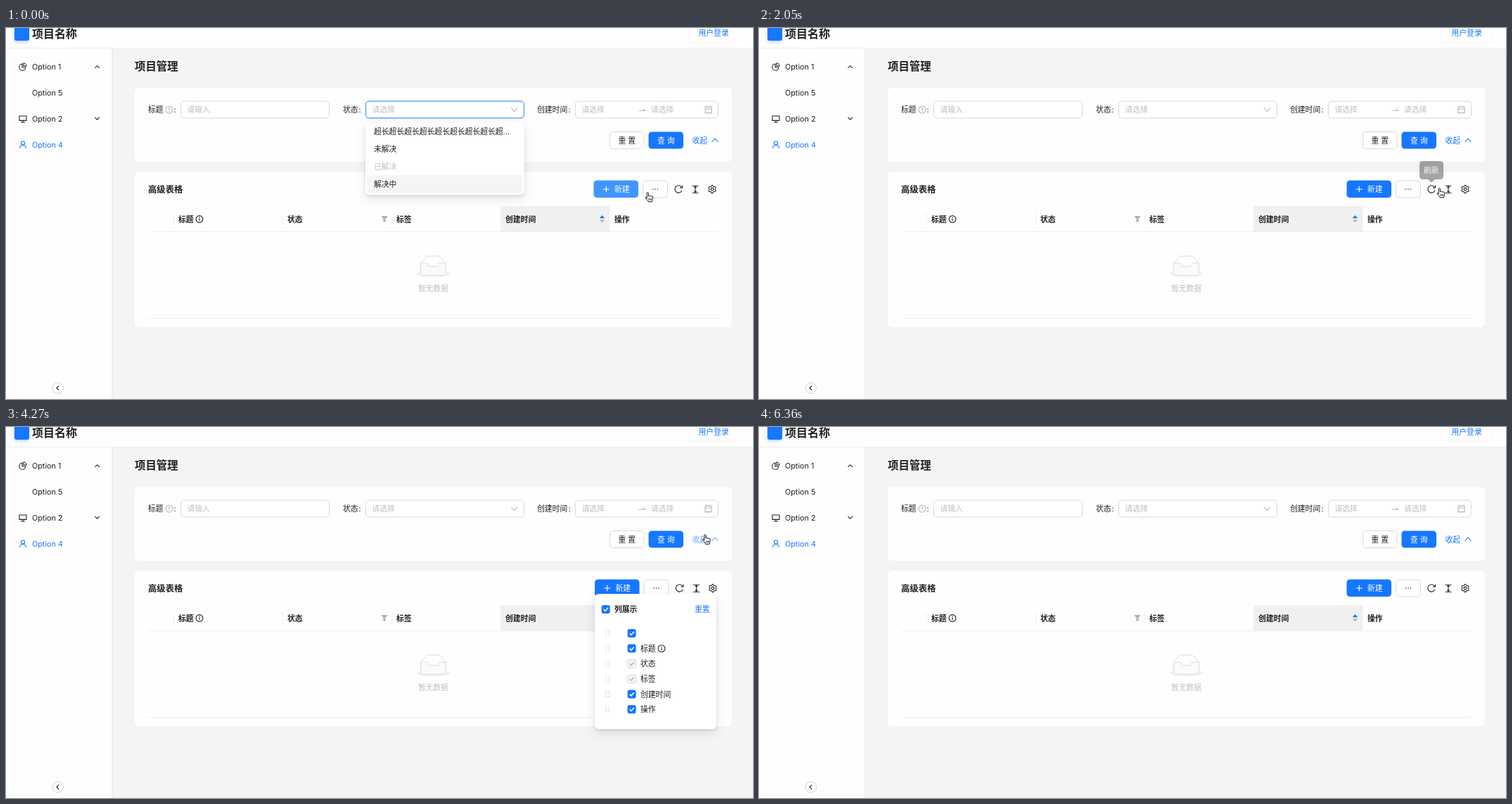
Animation, 1062 px wide and 527 px high, one loop 7110 ms. Source, as an HTML page:

```html
<!DOCTYPE html>
<html lang="zh-CN">
<head>
<meta charset="utf-8">
<title>项目管理</title>
<style>
html, body { margin: 0; width: 100%; height: 100%; overflow: hidden; background: #f4f4f4; }
svg { display: block; width: 100%; height: 100%; }
text { font-family: Inter, "Noto Sans CJK SC", "Noto Sans CJK JP", sans-serif; white-space: pre; fill: #1f1f1f; }
.b { font-weight: 600; }
.dim { fill: #bfbfbf; }
.blue { fill: #1677ff; }
.white { fill: #fff; }
.mid { text-anchor: middle; }
.ln { fill: none; stroke: #1f1f1f; stroke-width: 1.1; }
.gray { stroke: #b5b5b5; }
.lnblue { stroke: #1677ff; }
.lnwhite { stroke: #fff; }
.card { fill: #fefefe; }
.field { fill: #fff; stroke: #d9d9d9; }
.pop { fill: #fff; filter: drop-shadow(0 2px 2px rgba(0,0,0,.09)) drop-shadow(0 5px 7px rgba(0,0,0,.1)); }
.tip { fill: #212121; filter: drop-shadow(0 4px 6px rgba(0,0,0,.1)); }
.soft { fill: #fff; filter: drop-shadow(0 1.5px 1px rgba(0,0,0,.05)); }
</style>
</head>
<body>
<svg id="stage" viewBox="0 0 1062 527"></svg>
<script>
const LOOP = 7110, SIZE = 10.8, BLUE = '#1677ff';

// Drawing helpers; text is placed by its left edge and vertical centre.
const text = (x, y, str, cls = '', size = SIZE, id = '') =>
  `<text ${id && `id="${id}"`} x="${x}" y="${y + size * .38}" font-size="${size}" class="${cls}">${str}</text>`;
const rect = (x, y, w, h, r, attrs) =>
  `<rect x="${x}" y="${y}" width="${w}" height="${h}" rx="${r}" ${attrs}/>`;
const line = (d, cls = '', attrs = '') => `<path d="${d}" class="ln ${cls}" ${attrs}/>`;
const ring = (x, y, r, cls = '') => `<circle cx="${x}" cy="${y}" r="${r}" class="ln ${cls}"/>`;
const group = (id, body) => `<g id="${id}">${body}</g>`;
const chevron = (x, y, w, h, cls = '') => line(`M${x - w} ${y + h / 2}l${w} ${-h}l${w} ${h}`, cls);

const info = (x, y) => ring(x, y, 4.9) + line(`M${x} ${y - 1}v3.6M${x} ${y - 3}v1.2`);
const help = (x, y) => ring(x, y, 5, 'gray') +
  `<text x="${x}" y="${y + 2.7}" font-size="7.5" class="mid" style="fill:#8c8c8c">?</text>`;

function gear(x, y) {
  const pts = Array.from({ length: 60 }, (_, i) => {
    const a = i * Math.PI / 30, r = 4.9 + .75 * Math.cos(6 * a);
    return `${(x + r * Math.sin(a)).toFixed(2)} ${(y + r * Math.cos(a)).toFixed(2)}`;
  });
  return line(`M${pts.join('L')}Z`) + ring(x, y, 1.9);
}

const button = (x, y, w, label, main) =>
  rect(x, y, w, 24, 4.5, main ? `fill="${BLUE}"` : 'class="field"') +
  text(x + w / 2, y + 12, label, main ? 'mid white' : 'mid');

const check = (x, y, off) =>
  rect(x - 6, y - 6, 12, 12, 3, off ? 'fill="#f5f5f5" stroke="#d9d9d9"' : `fill="${BLUE}"`) +
  line(`M${x - 3} ${y}l2.2 2.4l4-4.6`, '', `style="stroke:${off ? '#b8b8b8' : '#fff'};stroke-width:1.5"`);

const tooltip = (id, x, y, w, label) => group(id,
  `<path class="tip" d="M${x - w / 2 + 5} ${y}h${w - 10}q5 0 5 5v16q0 5-5 5H${x + 5}l-5 4.5l-5-4.5H${x - w / 2 + 5}q-5 0-5-5v-16q0-5 5-5z"/>` +
  text(x, y + 13, label, 'mid white'));

const shell = () =>
  rect(0, 0, 1062, 527, 0, 'fill="#f4f4f4"') +
  rect(0, 0, 1062, 28, 0, 'fill="#fefefe"') +
  rect(0, 28, 151, 499, 0, 'fill="#fefefe"') +
  line('M0 28.5H1062', '', 'style="stroke:#eeeeee"') +
  line('M151 29V527', '', 'style="stroke:#e6e6e6"') +
  rect(12, -3, 21, 21, 3, `fill="${BLUE}" style="filter:drop-shadow(0 2px 2px rgba(22,119,255,.3))"`) +
  text(37, 8, '项目名称', 'b', 16) +
  rect(973, -5, 67, 24.5, 4.5, 'class="soft"') + text(984.5, 7, '用户登录', 'blue') +
  text(37, 55, 'Option 1') + text(37, 92, 'Option 5') +
  text(37, 129, 'Option 2') + text(37, 166, 'Option 4', 'blue') +
  line('M23 51A4.6 4.6 0 1 0 28 56H23ZM25 49.8V54H29A4.2 4.2 0 0 0 25 49.8Z') +
  line('M19 125h10v6.4h-10zM24 131.5v2.5M21 134h6') +
  ring(24, 163.6, 2.6, 'lnblue') + line('M19.5 171a4.5 4.6 0 0 1 9 0', 'lnblue') +
  chevron(129.7, 55.3, 3.2, 3.2) + chevron(129.7, 128.5, 3.2, -3.2) +
  '<circle cx="73.7" cy="511.5" r="7.7" fill="#fff" stroke="#cfcfcf"/>' +
  line('M75.2 508.3l-3.2 3.2l3.2 3.2', '', 'stroke-width="1.2"') +
  text(183, 54, '项目管理', 'b', 15.4);

const search = () =>
  rect(183, 85, 849, 105, 6, 'id="searchCard" class="card"') +
  text(202, 116, '标题') + help(232, 116) + text(238.5, 116, ':') +
  rect(248.5, 104, 211, 24, 4.5, 'class="field"') + text(257.5, 116, '请输入', 'dim') +
  text(479, 116, '状态') + text(501.5, 116, ':') +
  rect(511.5, 104, 225, 24, 4.5, 'class="field"') +
  rect(511.5, 104, 225, 24, 4.5, 'id="focus" fill="none" stroke="#4096ff" style="filter:drop-shadow(0 0 1.5px rgba(5,145,255,.3))"') +
  text(520.5, 116, '请选择', 'dim') + chevron(722.5, 116, 4.4, -5, 'gray') +
  group('range',
    text(755, 116, '创建时间') + text(799.5, 116, ':') +
    rect(809.5, 104, 203, 24, 4.5, 'class="field"') +
    text(818.5, 116, '请选择', 'dim') + text(917, 116, '请选择', 'dim') +
    line('M899.5 117.3h9l-2.8-2.6', 'gray') +
    line('M994 112h9v8.6h-9zM994 115h9M996.4 110.5v2.6M1000.6 110.5v2.6', 'gray')) +
  group('actions',
    button(858.5, 147.5, 48.5, '重 置') + button(913.5, 147.5, 49.5, '查 询', true) +
    group('link', text(975.5, 159.5, '收起', 'blue', SIZE, 'linkText') +
      `<path id="linkArrow" class="ln lnblue"/>`));

const toolbar = () => group('toolbar',
  rect(835.5, 216.5, 63.5, 24.5, 4.5, `id="add" fill="${BLUE}"`) +
  line('M849 229h8.6M853.3 224.7v8.6', 'lnwhite') + text(865, 229, '新建', 'white') +
  rect(905.5, 217, 35, 24, 4.5, 'id="more" class="field"') +
  [-3.4, 0, 3.4].map(d => `<circle cx="${923 + d}" cy="229" r=".75" fill="#1f1f1f"/>`).join('') +
  group('refresh', line('M960.4 226A5.2 5.2 0 1 0 961 230.6', '', 'stroke-width="1.3"') +
    line('M961.5 223.5v3.4h-3.4')) +
  group('density', line('M975.6 224.3h8.8M975.6 234.2h8.8M980 225v8.5M978.3 227l1.7-1.9l1.7 1.9M978.3 231.5l1.7 1.9l1.7-1.9')) +
  group('gear', gear(1004, 229)));

const table = () => group('table',
  rect(183, 204, 849, 221, 6, 'class="card"') +
  text(202, 229, '高级表格', 'b', 12.35) + toolbar() +
  rect(703, 253, 155.5, 36.5, 0, 'fill="#f0f0f0"') +
  line('M202 289.5H1013M238.5 263v17M393.5 263v17M548.5 263v17M202 412.5H1013', '', 'style="stroke:#eeeeee"') +
  text(245, 271.5, '标题', 'b') + info(275, 271.5) +
  text(400, 271.5, '状态', 'b') + text(555, 271.5, '标签', 'b') +
  text(710, 271.5, '创建时间', 'b') + text(865, 271.5, '操作', 'b') +
  '<path d="M533.5 267h9l-3 4.4h-3zM536.3 272h3.4v3.6h-3.4z" fill="#b0b0b0"/>' +
  `<path d="M843.8 270.3l3.7-4.4l3.7 4.4z" fill="${BLUE}"/>` +
  '<path d="M843.8 272.4l3.7 4.2l3.7-4.2z" fill="#b5b5b5"/>' +
  '<ellipse cx="607.5" cy="349" rx="24" ry="5.3" fill="#f2f2f2"/>' +
  '<g stroke="#d9d9d9" stroke-width=".9" fill="#fff"><path d="M589.7 334l7.9-9q.6-.9 1.5-.9h16.8q.9 0 1.5.9l7.9 9v8h-35.6z"/>' +
  '<path fill="#fafafa" d="M589.7 334h8.7q1.7 0 1.7 2.3t1.7 2.3h11.4q1.7 0 1.7-2.3t1.7-2.3h8.7v14q0 3.2-2.3 3.2h-31q-2.3 0-2.3-3.2z"/></g>' +
  text(607.5, 369.5, '暂无数据', 'mid dim'));

const selectPop = () => group('selectPop',
  rect(511, 134, 226, 103, 6, 'class="pop"') +
  rect(514, 209, 220, 25, 3.5, 'fill="#f5f5f5"') +
  text(523, 147, '超长'.repeat(8) + '超...') + text(523, 172, '未解决') +
  text(523, 196.5, '已解决', 'dim') + text(523, 221.5, '解决中'));

const menuPop = () => group('menuPop',
  rect(905, 245, 69, 80, 6, 'class="pop"') +
  ['1st', '2nd', '3rd'].map((n, i) => text(917.5, 260.3 + i * 24.7, n + ' item')).join(''));

const densityPop = () => group('densityPop',
  rect(975, 237, 62, 79, 6, 'class="pop"') +
  rect(977.5, 264, 56, 25, 3.5, 'fill="#e6f4ff"') +
  text(987, 252.5, '默认') + text(987, 276.7, '中等', 'blue') + text(987, 301, '紧凑'));

const columnsPop = () => group('columnsPop',
  rect(837, 237, 173, 192, 6, 'class="pop"') +
  check(852.7, 259) + text(865, 259, '列展示', 'b') + text(979, 259, '重置', 'blue') +
  ['', '标题', '状态', '标签', '创建时间', '操作'].map((name, i) => {
    const y = 293 + i * 21.6;
    const dots = [0, 1, 2, 3, 4, 5].map(k =>
      `<circle cx="${853.3 + k % 2 * 4}" cy="${y - 3.5 + (k >> 1) * 3.5}" r=".8" fill="#c8c8c8"/>`).join('');
    return dots + check(889.6, y, i === 2 || i === 3) + text(902, y, name);
  }).join('') + info(932, 314.6));

const hand = '<path id="hand" fill="#fff" stroke="#111" stroke-linejoin="round" d="M3.2 8.6V1.7a1.1 1.1 0 0 1 2.2 0V5.5a1.1 1 0 0 1 2.1.4a1.1 1 0 0 1 2 .5a1 1 0 0 1 2 .8V9.6c0 1.7-1 2.3-1 4.2H5c0-1.5-1.7-2.8-3.4-5C.4 7.2 1.9 6.3 3.2 8.6zM6 9.3v2.2M7.8 9.3v2.2M9.4 9.3v2.2"/>';

document.getElementById('stage').innerHTML =
  shell() + search() + table() + selectPop() + menuPop() + densityPop() + columnsPop() +
  tooltip('refreshTip', 956, 189, 34, '刷新') +
  tooltip('densityTip', 980, 189, 34, '密度') +
  tooltip('columnsTip', 1004.7, 188, 45, '列设置') + hand;

const el = id => document.getElementById(id);

// Each track holds its value from the given time until the next entry.
const cursor = [
  [0, 908, 233], [140, 913, 229], [290, 917, 227], [880, 925, 228], [1030, 938, 228],
  [1170, 950, 227], [1320, 954.5, 226], [2050, 963, 227], [2200, 972, 227], [2340, 973.5, 227],
  [2940, 977, 228], [3080, 990, 229], [3230, 1001.5, 232], [3380, 1000, 227], [3820, 1000, 215],
  [3970, 998, 195], [4120, 994, 170], [4270, 989.5, 152.5], [4710, 989, 140], [4860, 988, 125],
  [5010, 988, 114], [5160, 987.5, 112], [5610, 988, 150], [5760, 990, 230], [5910, 987, 326],
  [6060, 972, 415], [6210, 946, 504], [6360, -50, -50]
];
const tracks = {
  selectPop: [[0, 1], [140, .4], [290, 0]],
  menuPop: [[0, 0], [290, .5], [430, 1], [1320, .45], [1460, 0]],
  densityPop: [[0, 0], [2490, .6], [2640, 1], [3380, .4], [3530, 0]],
  columnsPop: [[0, 0], [3380, .5], [3530, 1], [4420, .45], [4560, 0]],
  refreshTip: [[0, 0], [1460, .6], [1610, 1], [2050, .4], [2200, 0]],
  densityTip: [[0, 0], [2200, .5], [2340, 1], [3080, .4], [3230, 0]],
  columnsTip: [[0, 0], [3080, .4], [3230, 1], [3970, .4], [4120, 0]]
};
const popTop = { selectPop: 134, menuPop: 245, densityPop: 237, columnsPop: 237 };

const at = (track, t) => track.findLast(step => step[0] <= t);
const within = (t, a, b) => t >= a && t < b;
const move = (id, x, y) => el(id).setAttribute('transform', `translate(${x} ${y})`);
const tint = (id, on) => el(id).querySelectorAll('.ln').forEach(p => p.style.stroke = on ? '#4096ff' : '');

function draw(t) {
  const folded = within(t, 4560, 5460), lift = folded ? -43.3 : 0;
  const shift = within(t, 3080, 4560) ? 1.5 : 0;

  for (const id in tracks) {
    const v = at(tracks[id], t)[1], node = el(id);
    node.style.opacity = v;
    node.style.display = v ? '' : 'none';
    if (id in popTop) {
      const s = .8 + .2 * v, dx = id === 'densityPop' ? shift : 0;
      node.setAttribute('transform', `translate(${dx} ${popTop[id] * (1 - s) + dx / 3}) scale(1 ${s})`);
    }
  }

  el('focus').style.opacity = at(tracks.selectPop, t)[1];
  el('searchCard').setAttribute('height', 105 + lift);
  el('range').style.display = folded ? 'none' : '';
  move('actions', 0, lift);
  move('table', 0, lift);
  move('toolbar', shift, 0);
  move('gear', shift ? -.7 : 0, 0);

  el('add').setAttribute('fill', t < 140 ? '#4096ff' : BLUE);
  el('more').style.stroke = within(t, 140, 1030) ? '#4096ff' : '';
  tint('refresh', within(t, 1320, 2050));
  tint('density', within(t, 2200, 3080));
  tint('gear', within(t, 3230, 3970));

  el('linkText').textContent = folded ? '展开' : '收起';
  el('linkArrow').setAttribute('d', folded ? 'M1003.5 157l4.4 5l4.4-5' : 'M1003.5 162l4.4-5l4.4 5');
  el('link').style.opacity = within(t, 4270, 5610) ? .65 : 1;

  const [, x, y] = at(cursor, t);
  move('hand', x, y);
}

const start = performance.now();
function tick() {
  draw((performance.now() - start) % LOOP);
  requestAnimationFrame(tick);
}
tick();
</script>
</body>
</html>
```
